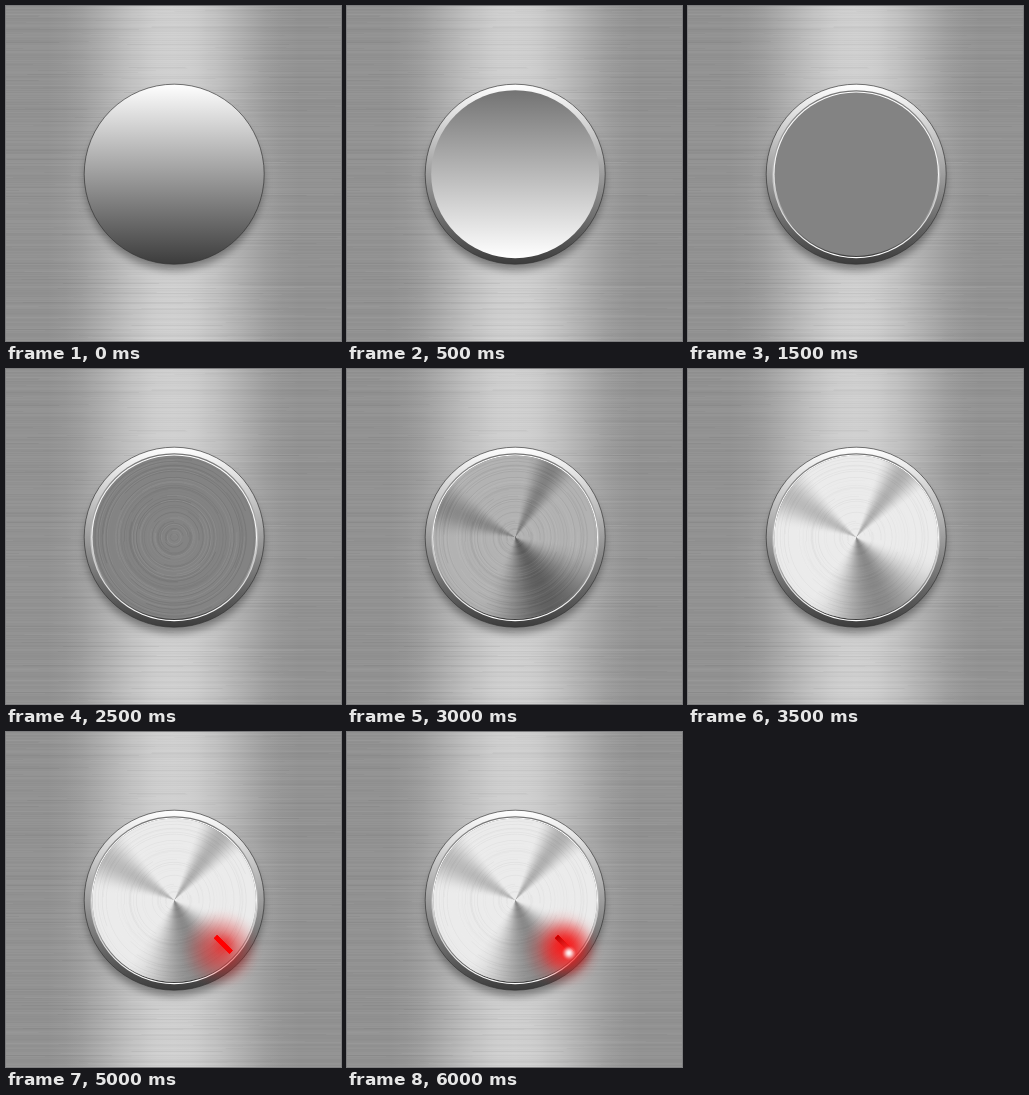
An HTML page with a canvas for the animation above (8 s loop, 335x335 px).

```html
<!DOCTYPE html>
<html lang="en">
<head>
<meta charset="utf-8">
<title>Metal knob</title>
<style>
html, body { margin: 0; width: 100%; height: 100%; overflow: hidden; background: #aaa; }
canvas { display: block; width: 335px; height: 335px; }
</style>
</head>
<body>
<canvas id="stage" width="335" height="335"></canvas>
<script>
const SIZE = 335, C = 168.2, TAU = Math.PI * 2;
const ctx = document.getElementById('stage').getContext('2d');

let seed;
const random = () => (seed = (seed * 16807) % 2147483647) / 2147483647;
const gray = (v, a = 1) => `rgba(${v},${v},${v},${a})`;
const grain = a => gray(random() < 0.5 ? 0 : 255, random() * a);

// Smooth hump: 1 at x = 0, falling to 0 at |x| = 1
const bell = x => Math.abs(x) < 1 ? (1 + Math.cos(Math.PI * x)) / 2 : 0;

function shade(gradient, color, steps = 40) {
  for (let i = 0; i <= steps; i++) gradient.addColorStop(i / steps, color(i / steps));
  return gradient;
}

function disc(r, fill, x = C, y = C) {
  ctx.beginPath();
  ctx.arc(x, y, r, 0, TAU);
  ctx.fillStyle = fill;
  ctx.fill();
}

// Gray levels spread evenly from top to bottom
function vertical(r, ...levels) {
  const last = levels.length - 1;
  return shade(ctx.createLinearGradient(0, C - r, 0, C + r), t => gray(levels[Math.round(t * last)]), last);
}

// Light metal with three dark wedges; angles in degrees clockwise from the top
function conic(light, depth, turn) {
  const wedge = (deg, center, half) => bell((deg - center - turn) / half);
  return shade(ctx.createConicGradient(-Math.PI / 2, C, C), t => {
    const deg = t * 360;
    const dark = 0.6 * wedge(deg, 36, 20) + wedge(deg, 160, 58) + 0.5 * wedge(deg, 301, 24);
    return gray(light - depth * dark);
  }, 120);
}

function glow(x, y, r, rgb, alpha) {
  const fill = ctx.createRadialGradient(x, y, 0, x, y, r);
  disc(r, shade(fill, t => `rgba(${rgb},${alpha * bell(t)})`), x, y);
}

function plate() {
  seed = 4711;
  ctx.fillStyle = shade(ctx.createLinearGradient(0, 0, SIZE, 0), t => gray(146 + 62 * bell((t - 0.5) / 0.39)));
  ctx.fillRect(0, 0, SIZE, SIZE);
  for (let y = 0; y < SIZE; y++) {
    ctx.fillStyle = grain(0.03);
    ctx.fillRect(0, y, SIZE, 1);
    ctx.fillStyle = grain(0.04);
    ctx.fillRect(random() * SIZE - 60, y, 50 + random() * 150, 1);
  }
}

function rim() {
  ctx.save();
  ctx.shadowColor = gray(0, 0.4);
  ctx.shadowBlur = 9;
  ctx.shadowOffsetY = 7;
  disc(89, gray(60));
  ctx.restore();
  disc(90, vertical(90, 255, 60));
  ctx.lineWidth = 1;
  ctx.strokeStyle = gray(50, 0.65);
  ctx.stroke();
}

function rings(strength) {
  seed = 977;
  ctx.lineWidth = 1;
  for (let r = 1; r < 81; r++) {
    const from = random() * TAU;
    ctx.beginPath();
    ctx.arc(C, C, r, from, from + 2 + random() * 4);
    ctx.strokeStyle = grain(strength);
    ctx.stroke();
  }
}

function bar(lit) {
  ctx.save();
  ctx.translate(217.3, 212.4);
  ctx.rotate(Math.PI / 4);
  ctx.fillStyle = lit
    ? shade(ctx.createLinearGradient(-11, 0, 11, 0), t => `rgb(${190 + 65 * t},${40 * t},${40 * t})`)
    : '#f00';
  ctx.fillRect(-11, -2.2, 22, 4.4);
  ctx.restore();
}

const red = '255,0,0';
const layers = [
  () => disc(84, vertical(84, 115, 255)),
  () => disc(82.8, vertical(82.8, 255, 245, 60)),
  () => disc(81.7, gray(131)),
  () => rings(0.015),
  () => rings(0.07),
  () => { disc(81.7, conic(178, 82, -8)); rings(0.07); },
  () => { disc(81.7, conic(235, 98, 0)); rings(0.04); },
  () => bar(false),
  () => { glow(217.5, 212.5, 15, red, 0.3); bar(false); },
  () => { glow(215, 217, 44, red, 0.52); bar(false); },
  () => { glow(219, 215, 32, red, 0.6); bar(false); },
  () => {
    bar(true);
    glow(218, 224, 24, '255,60,60', 0.25);
    glow(222, 221, 8, '255,255,255', 0.95);
  }
];

let shown = -1;
function frame() {
  const step = Math.min(layers.length, Math.floor(performance.now() % 8000 / 500));
  if (step !== shown) {
    shown = step;
    plate();
    rim();
    layers.slice(0, step).forEach(draw => draw());
  }
  requestAnimationFrame(frame);
}
frame();
</script>
</body>
</html>
```
